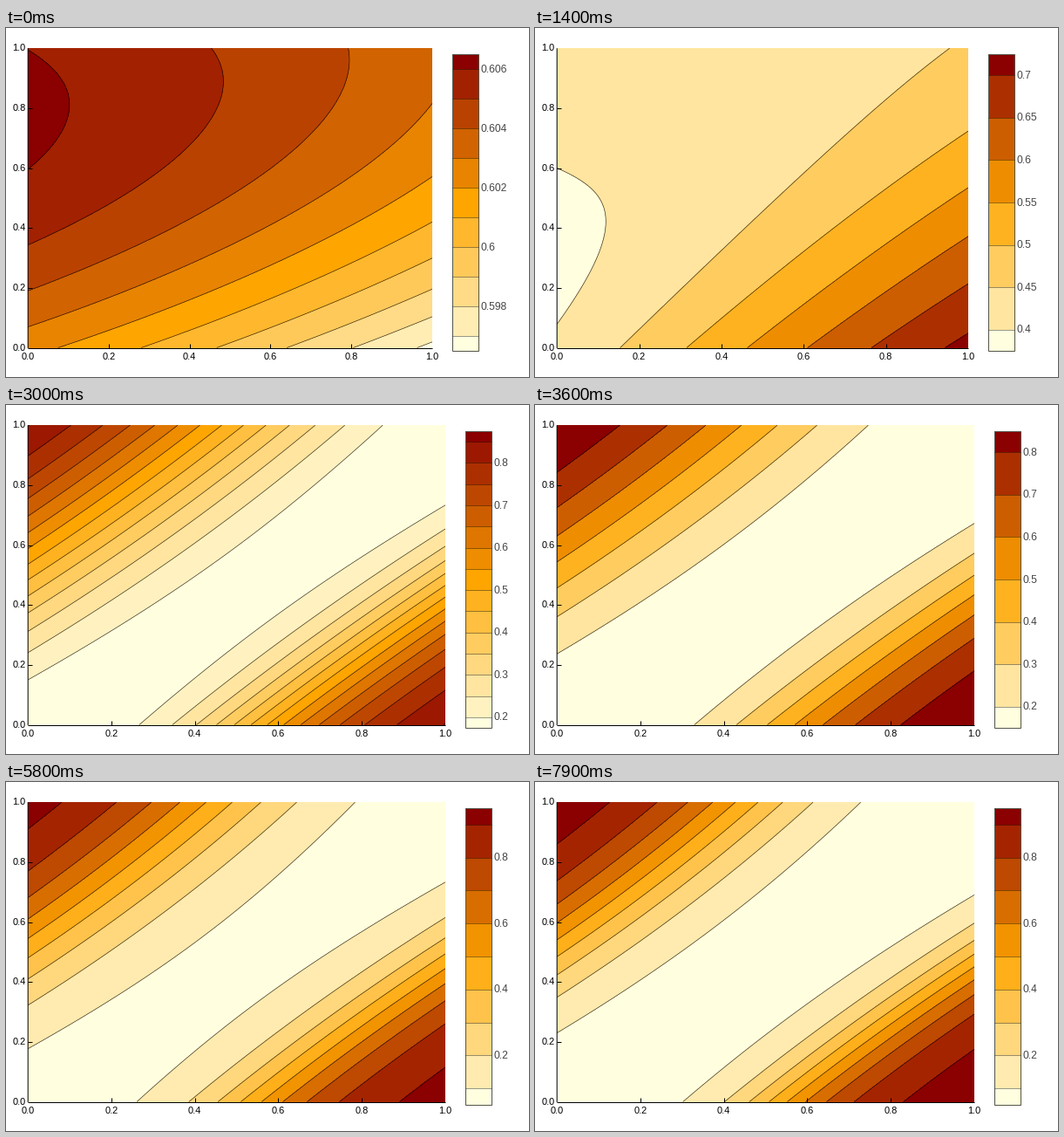
A matplotlib script that plays this animation: 600x400 px, repeating every 8 s.

```python
import numpy as np
import matplotlib.pyplot as plt
from matplotlib.animation import FuncAnimation
from matplotlib.colors import LinearSegmentedColormap
from matplotlib.patches import Rectangle

W, H, DPI = 600, 400, 100
PX = 72 / DPI
LEFT, TOP, BOTTOM = 25.2, 23.2, 366.5
BAR_TOP, BAR_H, BAR_W = 30, 340, 30
FRAMES, INTERVAL = 80, 100

plt.rcParams["font.family"] = "Liberation Sans"
cmap = LinearSegmentedColormap.from_list("heat", ["#ffffe0", "#ffa500", "#8b0000"], N=1024)

gx, gy = np.meshgrid(np.linspace(0, 1, 121), np.linspace(0, 1, 121))
P, Q = gx - gy, gx + gy - 1  # across and along the main diagonal

# Key poses of the surface, by training step:
# base, valley depth, valley width, saddle, tilt, twist, lean, sway, ripple
POSES = {
    0: (.422, -.127, .3, -.0049, .0019, .0108, -.01925, 0, 0),
    10: (-.225, 1.08, .9, -.05, .09, -.2, .585, 0, 0),
    16: (-.6, 2.78, 1, -.12, .12, -.21, .195, -.19, -.05),
    22: (-1.535, 4.907, 1.15, -.18, 0, 0, 0, -.12, -.1),
    33: (-2.2, 6.6, 1.2, -.36, -.05, .19, 0, -.06, -.13),
    59: (-2.92, 8.1, 1.28, -.45, -.12, .26, 0, -.03, -.17),
}


def pace(k):
    """Learning slows down: progress runs on logarithmic time."""
    return np.log(np.add(k, 8))


def surface(k):
    """Network output over the unit square after training step k."""
    keys = pace(list(POSES))
    base, depth, width, saddle, tilt, twist, lean, sway, ripple = (
        np.interp(pace(k), keys, c) for c in zip(*POSES.values()))
    u = (base + depth * np.tanh(width * P) ** 2
         + saddle * Q ** 2 + tilt * Q + twist * P * Q
         + lean * P + sway * np.sin(np.pi * P) + ripple * np.sin(2 * np.pi * P))
    return 1 / (1 + np.exp(-u))


def pick_levels(k, z):
    """Round contour levels and the subset that gets a label."""
    lo, hi = z.min(), z.max()
    for step in (.001, .002, .005, .01, .02, .05, .1):
        if (hi - lo) / step <= 15:
            break
    n = np.arange(np.ceil(lo / step), np.floor(hi / step) + 1).astype(int)
    thin = len(n) > 8 and (step < .03 or k >= 16)
    return n * step, [i for i, m in enumerate(n) if not thin or m % 2 == 0]


fig = plt.figure(figsize=(W / DPI, H / DPI), dpi=DPI, facecolor="white")
ax = fig.add_axes([0, 0, 1, 1])


def line(x, y, width=1, **kw):
    ax.plot(x, y, color="black", lw=width * PX, solid_capstyle="butt", **kw)


def draw_axes(right):
    line([LEFT, LEFT], [TOP, BOTTOM + .5], snap=False)
    line([LEFT, right], [BOTTOM, BOTTOM])
    for v in np.linspace(0, 1, 6):
        x = LEFT + v * (right - LEFT)
        y = BOTTOM + v * (TOP - BOTTOM)
        if 0 < v < 1:
            line([x, x], [BOTTOM, BOTTOM - 5])
            line([LEFT, LEFT + 5], [y, y])
        ax.text(x, 377.5, f"{v:.1f}", size=11 * PX, ha="center", va="center")
        ax.text(22.5, y, f"{v:.1f}", size=11 * PX, ha="right", va="center")


def draw_bar(x, colors, labels):
    n = len(colors) - 1
    cell = BAR_H / n
    cuts = [BAR_TOP + BAR_H - cell * (i + .5) for i in range(n)]
    ends = [BAR_TOP + BAR_H, *cuts, BAR_TOP]
    for color, y0, y1 in zip(colors, ends, ends[1:]):
        ax.add_patch(Rectangle((x, y1), BAR_W, y0 - y1, fc=color, ec="none"))
    for y in cuts:
        line([x, x + BAR_W], [y, y], width=.8, alpha=.5)
    ax.add_patch(Rectangle((x, BAR_TOP), BAR_W, BAR_H, fill=False, ec="#55554a", lw=PX))
    for i, text in labels.items():
        ax.text(x + BAR_W + 2.6, cuts[i] + .6, text, size=12 * PX, color="#444444",
                ha="left", va="center")


def draw(n):
    # Each group of four ticks shows three steps, the first held twice.
    group, tick = divmod(n, 4)
    k = 3 * group + max(0, tick - 1)
    z = surface(k)
    levels, shown = pick_levels(k, z)
    labels = {i: f"{levels[i]:.3f}".rstrip("0") for i in shown}
    # Longer labels leave less room for the plot.
    right = {5: 489, 4: 497}.get(max(map(len, labels.values())), 504)
    colors = [cmap(t) for t in np.linspace(0, 1, len(levels) + 1)]

    ax.clear()
    ax.axis("off")
    x = LEFT + gx * (right - LEFT)
    y = BOTTOM + gy * (TOP - BOTTOM)
    ax.contourf(x, y, z, levels=[-1, *levels, 2], colors=colors)
    ax.contour(x, y, z, levels=levels, colors="black", linewidths=.65 * PX, alpha=.8)
    draw_axes(right)
    draw_bar(right + 23, colors, labels)
    ax.set_xlim(0, W)
    ax.set_ylim(H, 0)
    return []


anim = FuncAnimation(fig, draw, frames=FRAMES, interval=INTERVAL, repeat=True,
                     repeat_delay=0, blit=False)
plt.show()
```
